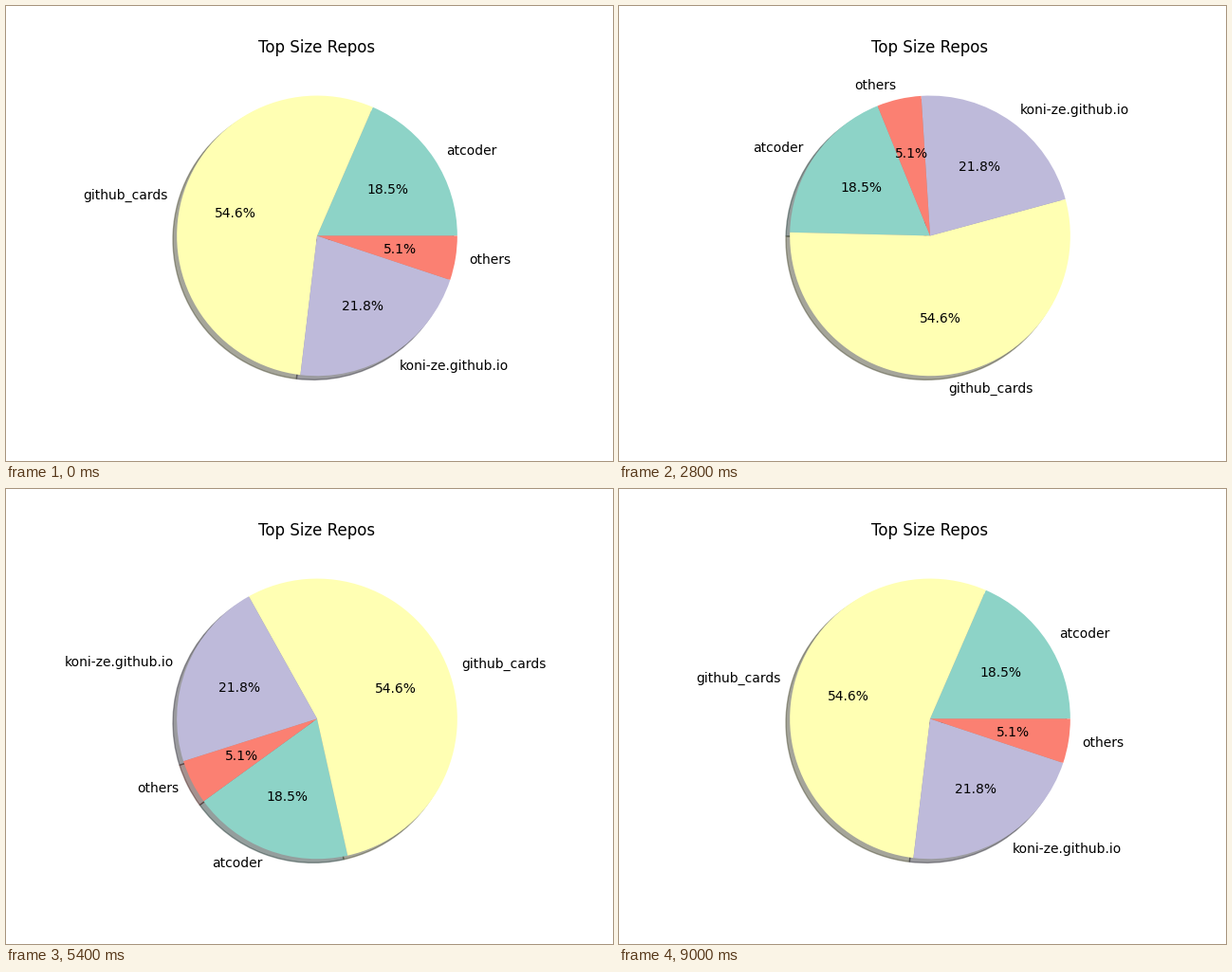
These frames come from a looping animation (640 px wide and 480 px high, 9100 ms). A matplotlib script:

```python
import matplotlib.pyplot as plt
from matplotlib.animation import FuncAnimation

LABELS = ["atcoder", "github_cards", "koni-ze.github.io", "others"]
SHARES = [18.5, 54.6, 21.8, 5.1]
COLORS = plt.get_cmap("Set3").colors[:len(SHARES)]
FRAMES = 91
STEP = 4  # degrees of rotation per frame

plt.rcParams["font.family"] = "DejaVu Sans"
fig, ax = plt.subplots(figsize=(6.4, 4.8), dpi=100)


def draw(i):
    ax.clear()
    ax.pie(SHARES, labels=LABELS, colors=COLORS, autopct="%1.1f%%",
           shadow=True, startangle=i * STEP)
    ax.set_title("Top Size Repos")
    return []


anim = FuncAnimation(fig, draw, frames=FRAMES, init_func=lambda: draw(0),
                     interval=100, repeat=True, repeat_delay=0)
plt.show()
```
